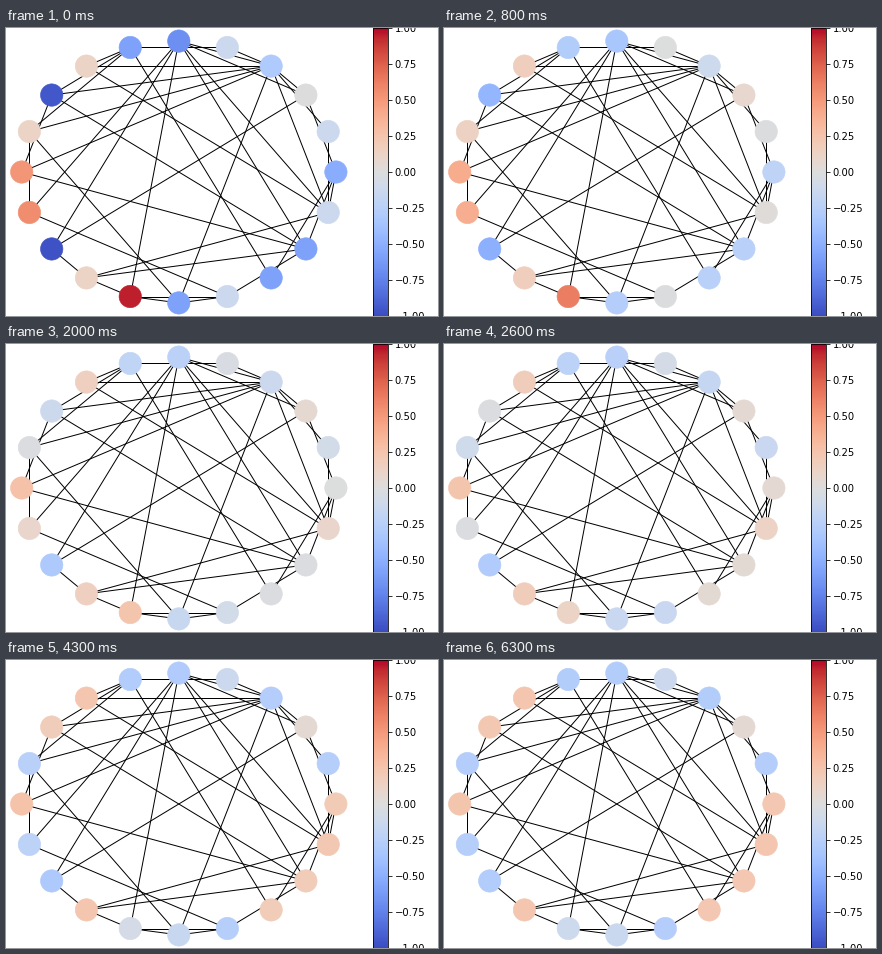
Recreate the animation shown at these times as a matplotlib script. Size 432x288 px, loop 6.6 s.

```python
import numpy as np
import matplotlib.pyplot as plt
from matplotlib.animation import FuncAnimation
from matplotlib.cm import ScalarMappable
from matplotlib.collections import LineCollection
from matplotlib.colors import Normalize

N = 20
FRAMES, STEP = 66, 100   # 6.6 s loop
TAU, SETTLE = 1.5, 5.0   # seconds

# first and last opinion of each node
START = np.array([-.52, -.13, 0, -.3, -.13, -.68, -.58, .12, -.95, .12,
                  .52, .56, -.97, .12, .95, -.58, -.13, -.58, -.58, -.13])
AGREE, DOUBT = [0, 7, 8, 10, 13, 17, 18, 19], [4, 14, 15]
END = np.full(N, -.27)
END[AGREE], END[DOUBT], END[2] = .24, -.13, .06

# small world: a ring with some links kept and the others rewired
NEAR = [2, 3, 6, 12, 13, 14, 15, 19]                # node to the next one
SKIP = [0, 1, 3, 4, 6, 8, 9, 14, 16, 18, 19]        # node to the next but one
HUBS = {3: (7, 8, 9, 10, 15, 19), 5: (2, 11, 12, 14, 18, 19)}
CHORDS = [(0, 17), (2, 12), (6, 9), (6, 17), (7, 19), (8, 18),
          (9, 15), (10, 18), (11, 16), (13, 18), (13, 19)]


def links():
    yield from ((i, (i + 1) % N) for i in NEAR)
    yield from ((i, (i + 2) % N) for i in SKIP)
    yield from ((hub, j) for hub, ends in HUBS.items() for j in ends)
    yield from CHORDS


def opinions(t):
    """Start values fade, pass a shared positive swell, then settle."""
    fade = np.exp(-t / TAU)
    u = min(t / SETTLE, 1)
    settle = u * u * (3 - 2 * u)
    swell = 0.36 * fade * (1 - fade) * (1 - settle)
    return START * fade + END * settle + swell


fig = plt.figure(figsize=(6, 4), dpi=72, facecolor="white")
ax = fig.add_axes([0, 0, 0.8, 1])
ax.set(xlim=(-1.1, 1.1), ylim=(-1.1, 1.1))
ax.axis("off")

angle = 2 * np.pi * np.arange(N) / N
pos = np.column_stack([np.cos(angle), np.sin(angle)])
ax.add_collection(LineCollection([(pos[a], pos[b]) for a, b in links()],
                                 colors="black", linewidths=1, zorder=1))

norm = Normalize(-1, 1)
nodes = ax.scatter(*pos.T, s=500, c=opinions(0), cmap="coolwarm",
                   norm=norm, linewidths=0.6, zorder=2)

cax = fig.add_axes([0.85, 0, 14.4 / 432, 1])
fig.colorbar(ScalarMappable(norm, "coolwarm"), cax=cax,
             ticks=np.linspace(-1, 1, 9))


def draw(i):
    nodes.set_array(opinions(i * STEP / 1000))
    return (nodes,)


anim = FuncAnimation(fig, draw, frames=FRAMES, interval=STEP,
                     repeat=True, repeat_delay=0)
plt.show()
```
